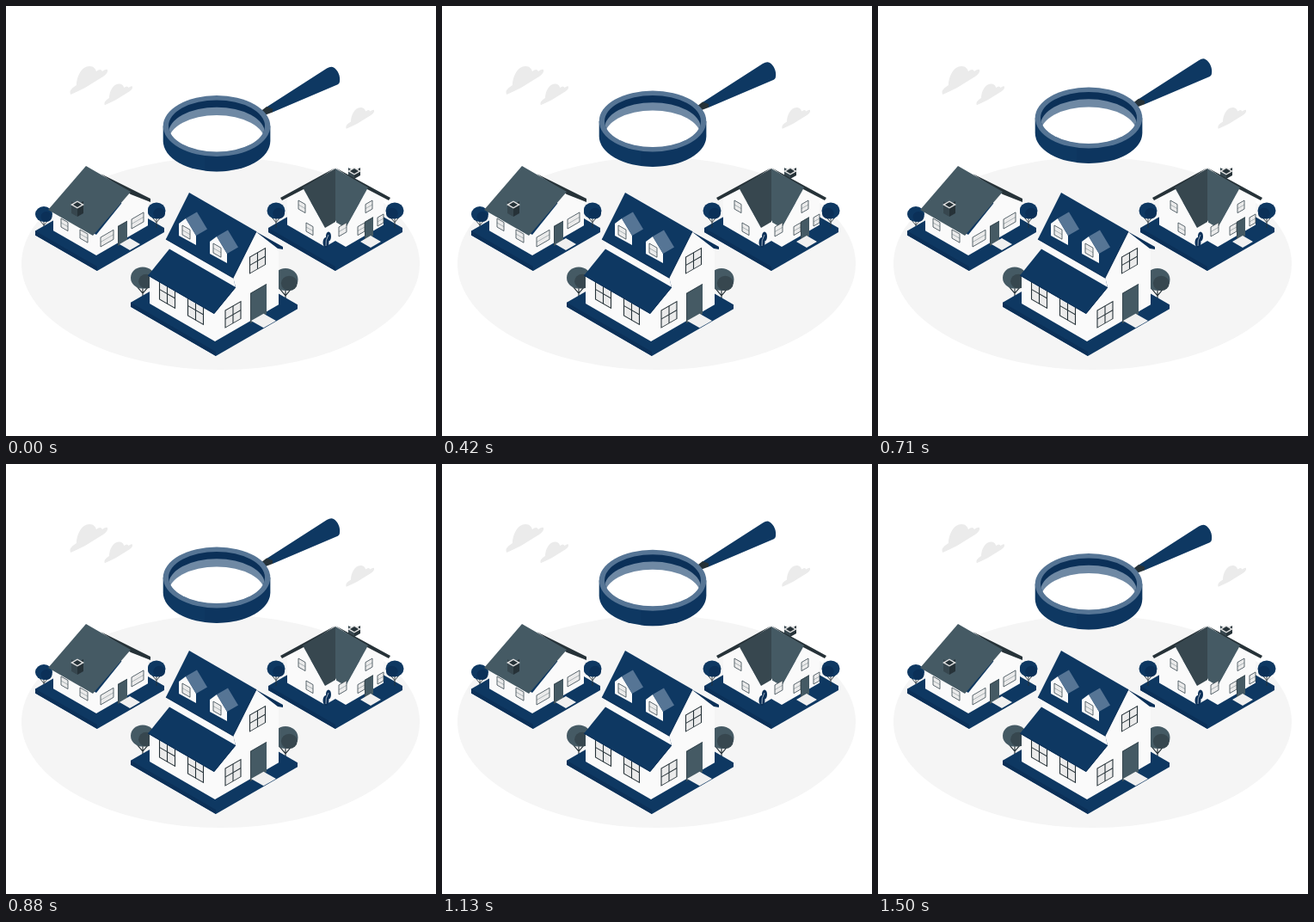
Write an HTML page that moves like this. It is 500 px wide and 500 px high and loops after 1.54 s.

```html
<!DOCTYPE html>
<html lang="en">
<head>
<meta charset="utf-8">
<title>House search</title>
<style>
html, body { margin: 0; width: 100%; height: 100%; overflow: hidden; background: #fff; }
svg { display: block; width: 100%; height: 100%; }
</style>
</head>
<body>
<svg id="stage" viewBox="0 0 500 500"></svg>
<script>
const navy = '#0e3862', deep = '#0b3058', haze = '#567595', pale = '#6f89a4';
const slate = '#455a64', coal = '#37474f', ink = '#263238', wall = '#fafafa';
const SLOPE = Math.tan(Math.PI / 6);

const path = (fill, d, extra = '') => `<path fill="${fill}" d="${d}" ${extra}/>`;
const poly = (fill, points) => `<polygon fill="${fill}" points="${points}"/>`;
const line = (color, width, d) => path('none', d, `stroke="${color}" stroke-width="${width}"`);
const ellipse = (fill, cx, cy, rx, ry, extra = '') =>
  `<ellipse fill="${fill}" cx="${cx}" cy="${cy}" rx="${rx}" ry="${ry}" ${extra}/>`;
const move = (x, y, body, scale = '1') => `<g transform="translate(${x} ${y}) scale(${scale})">${body}</g>`;

// Isometric helpers: side 1 runs up to the right, side -1 up to the left.
const along = ([x, y], side, length, rise = 0) => [x + side * length, y - length * SLOPE - rise];
const face = (corner, side, profile, fill = wall) =>
  poly(fill, profile.map(([length, rise]) => along(corner, side, length, rise)));
const roof = (fill, eave, ridge, length, side = -1) =>
  poly(fill, [eave, ridge, along(ridge, side, length), along(eave, side, length)]);
const diamond = (fill, x, y, r) =>
  poly(fill, [[x - r, y], [x, y - r * SLOPE], [x + r, y], [x, y + r * SLOPE]]);
const onWall = (x, y, side, body) =>
  `<g transform="matrix(1 ${-side * SLOPE} 0 1 ${x} ${y})">${body}</g>`;

function pane(x, y, w, h, side, large = false) {
  const mid = `M0 ${h / 2}H${w}` + (large ? `M${w / 2} 0V${h}` : '');
  return onWall(x, y, side, path('#ebebeb', `M0 0H${w}V${h}H0Z`) +
    line(large ? ink : '#78868c', large ? 1.1 : 0.5, mid) +
    line(large ? ink : coal, large ? 1.1 : 0.7, `M0 0V${h}H${w}V0Z`));
}

const door = (x, y, w, h) => onWall(x, y, 1, path(slate, `M0 0H${w}V${h}H0Z`) +
  line(coal, 1, `M0.5 ${h}V0.5H${w}`));

function plate(corner, right, left) {
  const [x, y] = corner, base = [x, y + 5];
  const r = along(corner, 1, right), l = along(corner, -1, left);
  return poly(navy, [base, along(base, 1, right), r, along(r, -1, left), l, along(base, -1, left)]) +
    face(base, -1, [[0, 0], [0, 5], [left, 5], [left, 0]], deep);
}

const tree = (x, y, r, color, dark) =>
  line(ink, r / 12, `M${x} ${y}v${r * 1.9}m${-r / 2} ${-r * 1.2}l${r / 2} ${r * 0.6}l${r / 2} ${-r * 0.6}`) +
  ellipse(color, x, y, r, r * 0.9) +
  ellipse(dark, x + r * 0.3, y + r * 0.3, r * 0.65, r * 0.6);

const chimney = (x, y, h) =>
  face([x, y + h], -1, [[0, 0], [7, 0], [7, h], [0, h]], coal) +
  face([x, y + h], 1, [[0, 0], [7, 0], [7, h], [0, h]], ink) +
  diamond('#e0e0e0', x, y, 8) + diamond(ink, x, y, 5);

const cloud = path('#ebebeb',
  'M1 33Q-2 28 8 22C8 12 14 0 23 0C28 0 30 3 31 6Q36 2 38 6Q42 3 44 4Q45 8 39 12L18 25Q6 31 1 33Z');

const leftHouse =
  tree(44, 242, 10, navy, deep) + plate([106, 303], 78, 72) + tree(175, 238, 10.5, navy, deep) +
  face([105, 290], -1, [[0, 0], [0, 24], [50, 24], [50, 0]]) +
  face([105, 290], 1, [[0, 0], [0, 24], [39, 50], [60, 32], [60, 0]]) +
  poly(ink, [[110, 195], [168, 224], [168, 228], [145, 219]]) +
  roof(slate, [101, 267], [145, 216], 52) + chimney(83, 231, 14) +
  pane(64, 247, 8, 10, -1) + pane(86, 260, 9, 10, -1) +
  pane(110, 269, 15, 11, 1) + pane(146, 248, 14, 11, 1) +
  door(130, 256, 11, 23) + diamond('#f0f0f0', 144, 277, 12);

// The corner house mirrors one wing about its middle line at x = 0.
const wing = roofColor =>
  tree(-69, 238, 10.5, navy, deep) +
  face([-12, 280], -1, [[0, 0], [0, 23], [26, 54], [44, 32], [44, 0]]) +
  face([-12, 280], 1, [[0, 0], [0, 23], [13, 23], [13, 0]]) +
  poly(ink, [[0, 188], [-64, 223], [-62, 226], [-37, 213]]) +
  poly(roofColor, [[0, 189], [-38, 211], [-12, 258], [0, 251]]) +
  pane(-43, 226, 8, 10, -1) + pane(-34, 252, 8, 10, -1);

const rightHouse =
  plate([383, 303], 78, 78) + chimney(405, 192, 9) +
  move(383, 0, wing(slate), '-1 1') + move(383, 0, wing(coal)) +
  pane(387, 257, 9, 11, 1) + pane(432, 246, 7, 10, 1) +
  door(417, 251, 10, 22) + diamond('#f0f0f0', 424, 274, 12) +
  ellipse(deep, 372, 275, 3.5, 6) + ellipse(deep, 375, 268, 3, 5.5) +
  line('#fafafa', 0.6, 'M372 279Q371 273 375 266');

const dormer = (x, y) => move(x, y,
  poly(wall, [[0, 6], [8, 0], [20, 20], [20, 31], [0, 20]]) +
  roof(haze, [20, 20], [8, 0], 13, 1) + pane(4, 8, 9, 11, -1));

const frontHouse =
  tree(159, 316, 14, slate, coal) + tree(325, 318, 14.5, slate, coal) +
  plate([244, 402], 95, 99) +
  face([243, 390], -1, [[0, 0], [0, 34], [76, 34], [76, 0]]) +
  roof(wall, [267, 328], [264, 314], 76) +
  face([243, 390], 1, [[0, 0], [0, 34], [24, 49], [21, 63], [48, 100], [74, 66], [74, 0]]) +
  poly(deep, [[290, 262], [322, 280], [322, 283], [316, 282]]) +
  roof(navy, [264, 316], [291, 262], 78) +
  line(deep, 1.2, 'M186 271L264 316L291 262') +
  pane(178.5, 318, 18, 23, -1, true) + pane(211.5, 337, 18, 23, -1, true) +
  roof(navy, [242, 358], [267, 327], 77) + line(deep, 1, 'M165 313L242 357.5L267 327') +
  dormer(201, 247) + dormer(237, 268) +
  pane(283.5, 292, 18, 19, 1, true) + pane(255, 354, 18, 20, 1, true) +
  door(284, 334, 19, 35) + diamond('#f0f0f0', 299.5, 366, 14.5);

const magnifier =
  path(navy, 'M303 118L373 73Q378 70 381 72C386 75 389 82 388 88Q388 91 384 92.5L310 124Z') +
  poly(ink, [[296, 123], [303, 117.5], [310, 120], [310, 124], [302, 127]]) +
  path(navy, 'M182.7 140V157.5A62.3 35.4 0 0 0 307.3 157.5V140Z') +
  path(deep, 'M231 170V192A62.3 35.4 0 0 0 307.3 157.5V140Z', 'opacity=".3"') +
  ellipse(haze, 245, 139.9, 62.3, 35.5) +
  '<clipPath id="opening"><ellipse cx="245" cy="139.9" rx="56" ry="30"/></clipPath>' +
  '<g clip-path="url(#opening)">' +
  ellipse(deep, 245, 139.9, 57, 31) +
  ellipse(pale, 245, 148.2, 56, 30) +
  ellipse('#fff', 245, 157.4, 56, 30) + '</g>';

document.getElementById('stage').innerHTML =
  ellipse('#f5f5f5', 249.5, 299.5, 231.5, 123.5) +
  move(74, 70, cloud) + move(114, 90.5, cloud, 0.75) + move(395, 118, cloud, 0.75) +
  leftHouse + rightHouse + frontHouse + `<g id="glass">${magnifier}</g>`;

const glass = document.getElementById('glass');
const LOOP = 1540, STEP = 1000 / 24, FLOAT = 1500, LIFT = 10;

// Linear float up and down, advanced at 24 steps per second.
function draw(now) {
  const time = Math.floor((now % LOOP) / STEP + 0.1) * STEP;
  const phase = ((time + 30) % FLOAT) / FLOAT;
  const lift = LIFT * (1 - Math.abs(1 - 2 * phase));
  glass.setAttribute('transform', `translate(0 ${-lift})`);
}

const start = performance.now();
function tick() {
  draw(performance.now() - start);
  requestAnimationFrame(tick);
}
tick();
</script>
</body>
</html>
```
